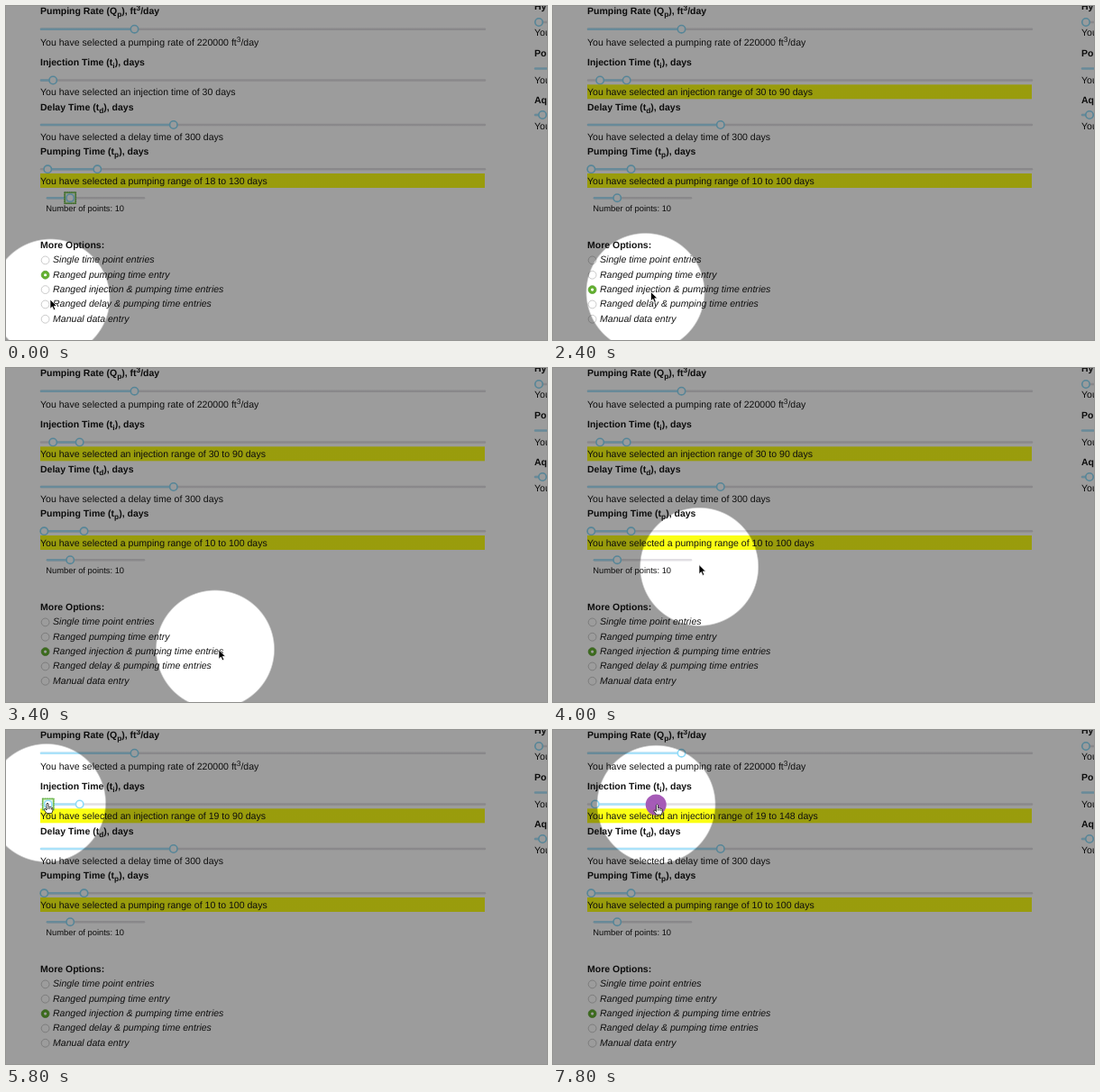
Animation, 600 px wide and 371 px high, one loop 8000 ms. Source, as an HTML page:

```html
<!DOCTYPE html>
<html lang="en">
<head>
<meta charset="utf-8">
<title>Pumping options</title>
<style>
  html, body { margin: 0; width: 100%; height: 100%; overflow: hidden; background: #fff; }
  svg { display: block; width: 100%; height: 100%; }
  text { font: 10.55px "Liberation Sans", Arial, sans-serif; fill: #151515; text-rendering: geometricPrecision; }
  .bold { font-weight: 700; font-size: 10.5px; }
  .italic { font-style: italic; }
  .small { font-size: 9.35px; }
  .shift { font-size: 8.3px; }
  .rail { stroke: #e1dfe3; stroke-width: 2.5; stroke-linecap: round; }
  .fill { stroke: #aae2fa; stroke-width: 2.5; stroke-linecap: round; }
  .knob { fill: #fbfeff; stroke: #8cdaf8; stroke-width: 1.6; }
  .bar { fill: #fbff14; }
  .ring { fill: #e2f3e0; stroke: #82cf5c; stroke-width: 1.6; }
  .dash { fill: none; stroke: #4d7f45; stroke-width: .6; stroke-dasharray: 1.5 1; }
  .radio { fill: #fff; stroke: #bdbdbd; stroke-width: .8; }
  .radio.on { fill: #62b02f; stroke: #5a9f30; }
  .dot { fill: #fff; }
</style>
</head>
<body>
<svg viewBox="0 0 600 371" preserveAspectRatio="none">
  <defs>
    <radialGradient id="spot" gradientUnits="userSpaceOnUse" cx="0" cy="0" r="66.3">
      <stop offset=".976" stop-opacity="0"/>
      <stop offset="1" stop-opacity=".39"/>
    </radialGradient>
  </defs>
  <g id="page"></g>
  <circle id="shade" r="800" fill="url(#spot)"/>
  <circle id="press" r="11.5" fill="#a254b4" fill-opacity=".96"/>
  <path id="arrow" d="M0 0V10.2L2.4 8L4 11.8L5.8 11L4.2 7.3H7.4Z" fill="#000" stroke="#fff" stroke-width=".7"/>
  <path id="hand" d="M0 1Q1 -.8 2 1V4.4Q3 3.6 3.8 4.7Q4.8 4 5.5 5.2Q6.6 4.8 6.8 6.2V8.5L5.8 11.6H.2L-2.6 7.8Q-2.8 6.2 -1.2 6.6L0 8ZM2 5V7M3.8 5.5V7M5.5 6V7.4"
        fill="#fff" stroke="#111" stroke-width=".8" stroke-linejoin="round"/>
</svg>
<script>
const $ = id => document.getElementById(id);
const DURATION = 8000, STEP = 200;

// time, pointer x, y, spotlight x, y
const path = [
  [0, 49, 326, 49.5, 324.5],
  [800, 45, 318, 45.5, 318],
  [1200, 44.5, 316.5, 44.5, 316.5],
  [1600, 44.5, 316.5, 44.5, 316.5],
  [2400, 108.5, 317.5, 102.5, 318],
  [3000, 215, 314, 207, 314],
  [3400, 236, 313, 232, 312.5],
  [3600, 236, 311, 235, 312],
  [4600, 51, 80, 53, 84],
  [4800, 50, 79.5, 47.5, 79],
  [5000, 50, 80, 50, 80],
  [5800, 45, 81, 45, 81],
  [6000, 46, 81, 46, 81],
  [6400, 84, 81.5, 82, 81.5],
  [6600, 84.5, 81.7, 84.7, 82],
  [7200, 110, 83.5, 109.5, 84],
  [7800, 114.5, 82.5, 114.5, 82.7]
];
const lowDays = [[5000, 30], [5800, 19]];
const highDays = [[6600, 90], [7200, 140], [7800, 148]];

function sample(keys, t) {
  const i = keys.findIndex(k => k[0] > t);
  if (i === 0) return keys[0].slice(1);
  if (i < 0) return keys[keys.length - 1].slice(1);
  const a = keys[i - 1], b = keys[i], p = (t - a[0]) / (b[0] - a[0]);
  return a.slice(1).map((v, n) => v + (b[n + 1] - v) * p);
}

const text = (x, y, s, cls = "") => `<text x="${x}" y="${y}" class="${cls}">${s}</text>`;
const shift = (s, dy) => `<tspan class="shift" dy="${dy}">${s}</tspan><tspan dy="${-dy}">&#8203;</tspan>`;
const line = (x1, x2, y, cls) => `<line x1="${x1}" x2="${x2}" y1="${y}" y2="${y}" class="${cls}"/>`;
const knob = (x, y) => `<circle cx="${x}" cy="${y}" r="4.2" class="knob"/>`;
const box = (x, y, r, cls) => `<rect x="${x - r}" y="${y - r}" width="${2 * r}" height="${2 * r}" class="${cls}"/>`;
const focus = (x, y) => box(x, y, 6, "ring") + box(x, y, 6.4, "dash") + knob(x, y);
const slider = (y, from, to, start = 39, end = 531) =>
  line(start, end, y, "rail") + line(from ?? start, to, y, "fill") +
  (from == null ? "" : knob(from, y)) + knob(to, y);
const bar = y => `<rect x="38" y="${y}" width="493" height="16" class="bar"/>`;
const dayX = days => 37.4 + days * 0.4917;
const title = (y, name, sub, unit) => text(38, y, `${name} (${sub}), ${unit}`, "bold");
const chosen = (y, s) => text(38, y, "You have selected " + s);

const options = ["Single time point entries", "Ranged pumping time entry",
  "Ranged injection &amp; pumping time entries", "Ranged delay &amp; pumping time entries", "Manual data entry"];

function radios(selected) {
  return options.map((label, i) => {
    const y = 282.4 + i * 16.35, on = i === selected;
    return `<circle cx="43.6" cy="${y}" r="4.4" class="radio ${on ? "on" : ""}"/>` +
      (on ? `<circle cx="43.6" cy="${y}" r="1.6" class="dot"/>` : "") +
      text(52, y + 3, label, "italic");
  }).join("");
}

function sidePanel() {
  return text(586, 4.3, "Hydraulic", "bold") + line(587, 600, 18, "rail") + knob(591, 18) + text(586, 33.2, "You have") +
    text(586, 56.3, "Porosity", "bold") + line(587, 600, 69.5, "fill") + text(586, 85.6, "You have") +
    text(586, 107.6, "Aquifer", "bold") + line(587, 600, 121, "rail") + line(587, 595, 121, "fill") + knob(595, 121) +
    text(586, 137.1, "You have");
}

function page(t) {
  const ranged = t >= 1400;
  const low = Math.round(sample(lowDays, t)[0]), high = Math.round(sample(highDays, t)[0]);
  const [pumpLow, pumpHigh] = ranged ? [10, 100] : [18, 130];
  let s = title(9.4, "Pumping Rate", "Q" + shift("p", 3), "ft" + shift("3", -4) + "/day") +
    slider(25.7, null, 142.5) + chosen(44.2, "a pumping rate of 220000 ft" + shift("3", -4) + "/day");

  s += title(66.2, "Injection Time", "t" + shift("i", 3), "days");
  s += ranged
    ? slider(82.5, dayX(low), dayX(high)) + bar(87.3) + chosen(98.9, `an injection range of ${low} to ${high} days`)
    : slider(82.5, null, dayX(30)) + chosen(98.9, "an injection time of 30 days");
  if (t >= 5800 && t < 6600) s += focus(dayX(low), 82.5);
  if (t >= 6600 && t < 6800) s += focus(dayX(high), 82.5);

  s += title(115.9, "Delay Time", "t" + shift("d", 3), "days") +
    slider(132, null, 185.8) + chosen(148.6, "a delay time of 300 days");

  s += title(165.4, "Pumping Time", "t" + shift("p", 3), "days") +
    slider(181.3, dayX(pumpLow), dayX(pumpHigh)) + bar(186) +
    chosen(197.6, `a pumping range of ${pumpLow} to ${pumpHigh} days`);

  s += slider(213.2, null, 71.2, 46, 153) + text(44.3, 228.2, "Number of points: 10", "small");
  if (t < 1200) s += focus(71.2, 213.2);

  return s + text(38, 269.4, "More Options:", "bold") + radios(t < 1200 ? 1 : 2) + sidePanel();
}

function place(el, x, y, visible = true) {
  el.setAttribute("transform", `translate(${x} ${y})`);
  el.style.display = visible ? "" : "none";
}

let shown = -1;
function draw(now) {
  const t = Math.floor(now % DURATION / STEP) * STEP;
  if (t !== shown) {
    shown = t;
    const [x, y, sx, sy] = sample(path, t);
    const onSlider = t >= 4600;
    const pressed = t === 1200 || (t >= 5000 && t < 5800) || t >= 6800;
    $("page").innerHTML = page(t);
    place($("shade"), sx, sy);
    place($("press"), x - .3, y + .5, pressed);
    place($("arrow"), x, y, !onSlider);
    place($("hand"), x, y, onSlider);
  }
  requestAnimationFrame(draw);
}
draw(performance.now());
</script>
</body>
</html>
```
